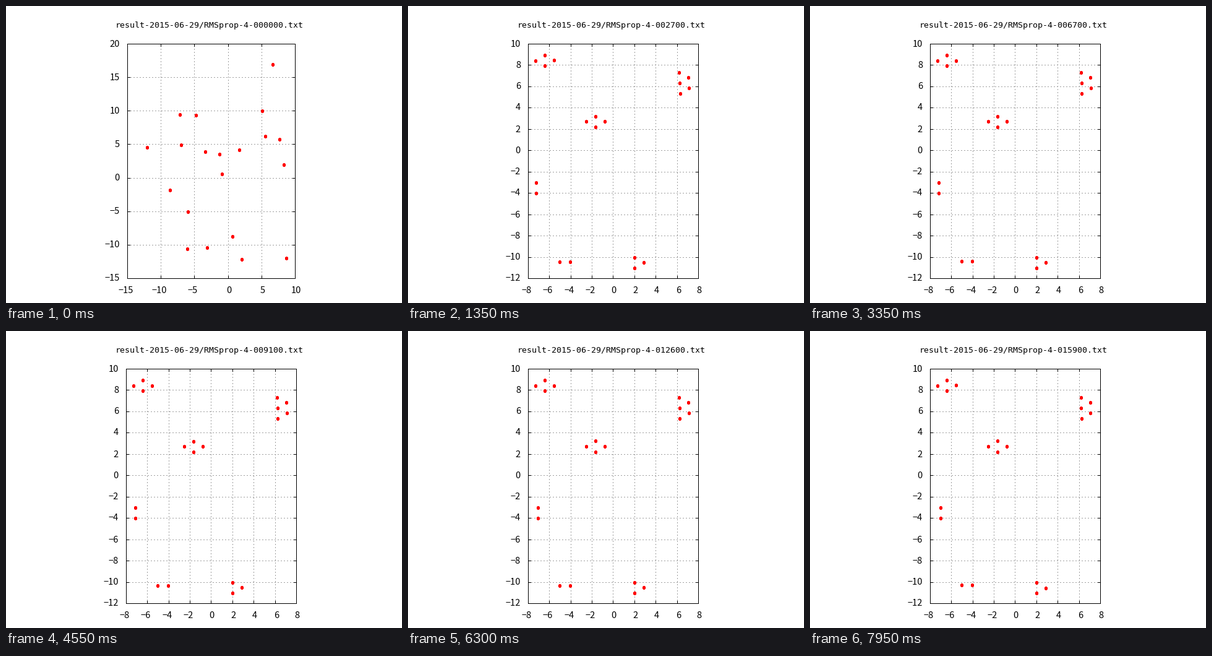
Write a matplotlib script that moves like this. It is 640 px wide and 480 px high and loops after 8000 ms.

```python
import math

import numpy as np
import matplotlib.pyplot as plt
from matplotlib.animation import FuncAnimation
from matplotlib.collections import LineCollection, PolyCollection

W, H, DPI = 640, 480, 100
FRAMES, INTERVAL = 160, 50
TOP, BOTTOM, MID_X = 60, 439, 330.5
PX = 72 / DPI  # one pixel in points
SPEED = 1.05   # units per frame along each axis
CONTACT = 11   # frame at which the groups have formed

# Unit-distance arrangements the points settle into
R3 = math.sqrt(3) / 2
UPRIGHT = [(0, .5), (0, -.5)]
FLAT = [(-.5, 0), (.5, 0)]
DIAMOND = [(-R3, 0), (0, .5), (R3, 0), (0, -.5)]
STRIP = [(0, 1), (R3, .5), (0, 0), (R3, -.5), (0, -1)]
TRIANGLE = [(0, .5), (R3, 0), (0, -.5)]

# shape, centre, drift per frame, tilt in degrees, tilt decay, jitter in degrees
GROUPS = [
    (DIAMOND, (-6.371, 8.334), (0, 0), 9.5, 8, 1.8),
    (STRIP, (6.319, 6.227), (-.00028, 0), 3.5, 120, 0),
    (DIAMOND, (-1.6, 2.609), (0, .0001), 6, 8, 0),
    (UPRIGHT, (-7.235, -3.61), (.00175, 0), 9.5, 8, 0),
    (FLAT, (-4.48, -10.58), (0, .00136), 0, 1, 0),
    (TRIANGLE, (2.065, -10.635), (0, 0), 0, 1, -1.8),
]

START = np.array([
    (-11.96, 4.4), (-7.07, 9.29), (-4.67, 9.2), (-6.88, 4.76),
    (5.2, 9.84), (6.77, 16.77), (5.66, 6.06), (7.79, 5.6), (8.43, 1.81),
    (-3.28, 3.75), (-1.16, 3.38), (1.79, 4.03), (-.79, .43),
    (-8.54, -1.97), (-5.87, -5.2),
    (-5.96, -10.74), (-3.0, -10.56),
    (.78, -8.9), (8.8, -12.13), (2.16, -12.31),
])

# Outline of the small point symbol, in pixels
DOT = np.array([(-1, -3), (2, -3), (2, -2), (3, -2), (3, 2), (2, 2),
                (2, 3), (-1, 3), (-1, 2), (-2, 2), (-2, -2), (-1, -2)])


def targets(n):
    age = max(0, n - CONTACT)
    shake = max(0, math.cos(2 * math.pi * .527 * (n - 43))) if age else 0
    out = []
    for shape, centre, drift, tilt, decay, jitter in GROUPS:
        a = math.radians(tilt * math.exp(-age / decay) + jitter * shake)
        c, s = math.cos(a), math.sin(a)
        for x, y in shape:
            out.append((centre[0] + drift[0] * n + x * c - y * s,
                        centre[1] + drift[1] * n + x * s + y * c))
    return np.array(out)


def points(n):
    reach = SPEED * n
    return START + np.clip(targets(n) - START, -reach, reach)


def axis_ticks(values):
    lo, hi = values.min(), values.max()
    step = 5 if hi - lo > 20 else 2
    first, last = math.floor(lo / step), math.ceil(hi / step)
    return [k * step for k in range(first, last + 1)]


def minus(v):
    return str(v).replace("-", "\u2212")


fig = plt.figure(figsize=(W / DPI, H / DPI), dpi=DPI, facecolor="white")
ax = fig.add_axes([0, 0, 1, 1])
ax.set_xlim(0, W)
ax.set_ylim(H, 0)
ax.axis("off")

grid = LineCollection([], colors="#a0a0a0", linewidths=PX,
                      linestyles=[(0, (2, 3))], antialiaseds=False, zorder=1)
border = LineCollection([], colors="black", linewidths=PX,
                        capstyle="projecting", antialiaseds=False, zorder=2)
dots = PolyCollection([], facecolors="#ff0000", edgecolors="none",
                      antialiaseds=False, zorder=3)
for artist in (grid, border, dots):
    ax.add_collection(artist, autolim=False)

title = ax.text(329, 34.5, "", family="DejaVu Sans Mono", size=13.29 * PX,
                ha="center", va="baseline")
label_style = dict(family="Noto Sans CJK JP", size=14.6 * PX, va="baseline")
x_labels = [ax.text(0, 0, "", ha="center", **label_style) for _ in range(16)]
y_labels = [ax.text(0, 0, "", ha="right", **label_style) for _ in range(16)]


def fill(labels, items):
    for label in labels:
        label.set_text("")
    for label, (x, y, value) in zip(labels, items):
        label.set_position((x, y))
        label.set_text(minus(value))


def draw(n):
    pos = points(n)
    xt, yt = axis_ticks(pos[:, 0]), axis_ticks(pos[:, 1])
    x_span, y_span = xt[-1] - xt[0], yt[-1] - yt[0]
    half = (BOTTOM - TOP) * x_span / y_span / 2
    left, right = round(MID_X - half), round(MID_X + half)

    def to_x(v):
        return np.rint(left + (v - xt[0]) * (right - left) / x_span)

    def to_y(v):
        return np.rint(BOTTOM - (v - yt[0]) * (BOTTOM - TOP) / y_span)

    l, r, t, b = left + .5, right + .5, TOP + .5, BOTTOM + .5
    lines = []
    edges = [[(l, t), (r, t)], [(r, t), (r, b)], [(r, b), (l, b)], [(l, b), (l, t)]]
    for v in xt[1:-1]:
        x = to_x(v) + .5
        lines.append([(x, b), (x, t)])
        edges += [[(x, b), (x, b - 4)], [(x, t), (x, t + 4)]]
    for v in yt[1:-1]:
        y = to_y(v) + .5
        lines.append([(l, y), (r, y)])
        edges += [[(l, y), (l + 4, y)], [(r, y), (r - 4, y)]]
    grid.set_segments(lines)
    border.set_segments(edges)

    fill(x_labels, [(to_x(v) + (2.7 if v >= 0 else -1), 464.5, v) for v in xt])
    fill(y_labels, [(left - 11, to_y(v) + 5.5, v) for v in yt])

    centres = np.column_stack([to_x(pos[:, 0]), to_y(pos[:, 1])])
    dots.set_verts([c + DOT for c in centres])
    title.set_text(f"result-2015-06-29/RMSprop-4-{n * 100:06d}.txt")
    return [grid, border, dots, title, *x_labels, *y_labels]


anim = FuncAnimation(fig, draw, frames=FRAMES, interval=INTERVAL,
                     init_func=lambda: draw(0), repeat=True, repeat_delay=0)
plt.show()
```
